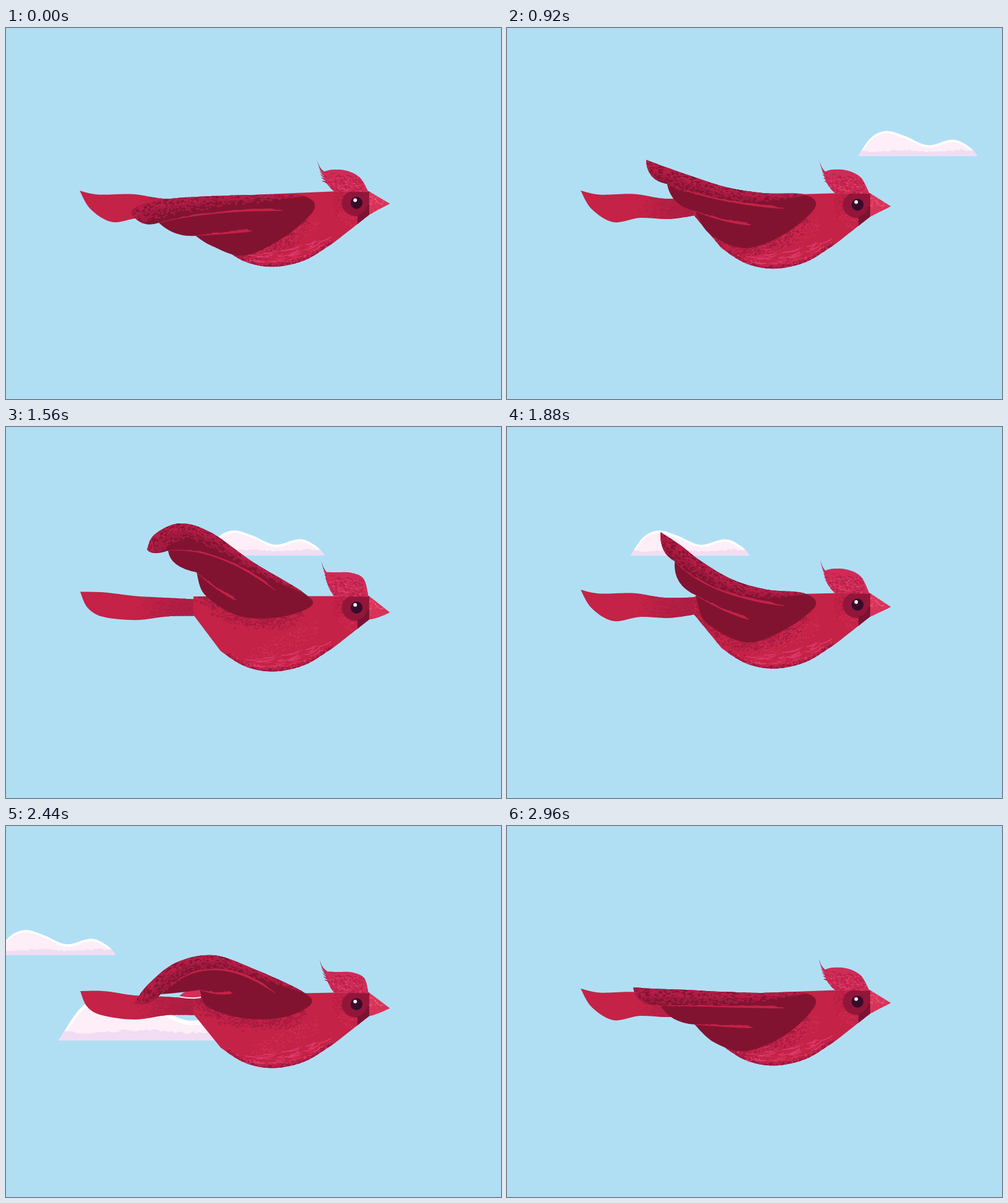
Write an HTML page with a canvas that moves like this. It is 800 px wide and 600 px high and loops after 3 s.

```html
<!DOCTYPE html>
<html lang="en">
<head>
<meta charset="utf-8">
<title>Flying bird</title>
<style>
html, body { margin: 0; width: 100%; height: 100%; overflow: hidden; background: #b0dff4; }
canvas { display: block; width: 800px; height: 600px; }
</style>
</head>
<body>
<canvas id="stage" width="800" height="600"></canvas>
<script>
const ctx = document.getElementById('stage').getContext('2d');
const LOOP = 3000, FLAP = 1000, STEP = 40;
const RED = '#c42246', DARK = '#811331', SHADE = '#a31a41', PINK = '#df3a6d';

// ---- helpers ----
function seeded(seed) {
  return () => {
    seed = (seed + 0x6d2b79f5) | 0;
    let r = Math.imul(seed ^ (seed >>> 15), 1 | seed);
    r ^= r + Math.imul(r ^ (r >>> 7), 61 | r);
    return ((r ^ (r >>> 14)) >>> 0) / 4294967296;
  };
}
function grains(count, seed) {
  const rnd = seeded(seed);
  return Array.from({ length: count }, () => [rnd(), rnd(), rnd(), rnd()]);
}
const swing = (phase, low) => Math.cos(2 * Math.PI * (phase - low) / FLAP);
const lerp = (a, b, k) => a + (b - a) * k;
const shift = (pts, dy) => pts.map(([x, y]) => [x, y + dy]);
const mix = (p, q, k) => p.map((a, i) => [lerp(a[0], q[i][0], k), lerp(a[1], q[i][1], k)]);

// bezier handles of a smooth curve through points
function handles(pts, i) {
  const a = pts[i - 1] || pts[i], b = pts[i], c = pts[i + 1], d = pts[i + 2] || c;
  return [b[0] + (c[0] - a[0]) / 6, b[1] + (c[1] - a[1]) / 6,
          c[0] - (d[0] - b[0]) / 6, c[1] - (d[1] - b[1]) / 6, c[0], c[1]];
}
function curve(path, pts) {
  path.lineTo(...pts[0]);
  for (let i = 0; i < pts.length - 1; i++) path.bezierCurveTo(...handles(pts, i));
}
function through(path, a, m, b) {
  path.quadraticCurveTo(2 * m[0] - (a[0] + b[0]) / 2, 2 * m[1] - (a[1] + b[1]) / 2, ...b);
}
function onCurve(pts, s) {
  const n = pts.length - 1, i = Math.min(n - 1, Math.floor(s * n)), t = s * n - i, u = 1 - t;
  const h = handles(pts, i), p = pts[i];
  const at = k => u * u * u * p[k] + 3 * u * u * t * h[k] + 3 * u * t * t * h[k + 2] + t * t * t * h[k + 4];
  const slope = k => u * u * (h[k] - p[k]) + 2 * u * t * (h[k + 2] - h[k]) + t * t * (h[k + 4] - h[k + 2]);
  return { x: at(0), y: at(1), angle: Math.atan2(slope(1), slope(0)) };
}
function beside(pts, s, d) {
  const p = onCurve(pts, s);
  return { x: p.x - Math.sin(p.angle) * d, y: p.y + Math.cos(p.angle) * d, angle: p.angle };
}
function fleck(p, w, h, color) {
  ctx.fillStyle = color;
  ctx.beginPath();
  ctx.ellipse(p.x, p.y, w, h, p.angle || 0, 0, 7);
  ctx.fill();
}
function fill(path, color) {
  ctx.fillStyle = color;
  ctx.fill(path);
}
function inside(path, draw) {
  ctx.save();
  ctx.clip(path);
  draw();
  ctx.restore();
}

// ---- wing poses: top edge, lower lobes, shoulder, then streak points ----
const poses = [];
const pose = (at, ...n) => poses.push({ at, n });
pose(0, 202, 300, 214, 288, 260, 277, 310, 273, 400, 270, 478, 271,
  222, 316, 247, 315, 274, 332, 306, 336, 334, 353, 385, 368, 450, 338, 498, 293,
  340, 299, 447, 295, 397, 328);
pose(120, 222, 380, 235, 360, 270, 325, 320, 297, 390, 275, 478, 269,
  245, 386, 272, 378, 290, 382, 322, 372, 346, 371, 390, 370, 446, 344, 498, 293,
  345, 312, 447, 296, 396, 338);
pose(240, 212, 345, 232, 328, 270, 304, 320, 283, 400, 268, 478, 270,
  236, 350, 262, 341, 285, 349, 314, 344, 348, 355, 390, 362, 450, 336, 498, 292,
  340, 299, 445, 293, 395, 323);
pose(440, 207, 287, 230, 256, 275, 221, 335, 209, 400, 231, 478, 267,
  230, 286, 250, 272, 283, 269, 313, 265, 327, 293, 385, 311, 450, 309, 493, 288,
  335, 232, 435, 270, 366, 270);
pose(560, 228, 198, 240, 174, 280, 156, 330, 170, 400, 219, 478, 266,
  240, 204, 262, 200, 275, 222, 308, 235, 322, 272, 375, 305, 440, 308, 494, 289,
  345, 212, 435, 264, 372, 280);
pose(680, 303, 112, 322, 138, 350, 170, 385, 207, 425, 242, 478, 269,
  297, 140, 306, 165, 302, 195, 315, 222, 320, 270, 372, 318, 440, 318, 497, 288,
  370, 222, 440, 278, 378, 290);
pose(800, 281, 125, 305, 152, 335, 183, 375, 222, 420, 250, 478, 269,
  278, 152, 292, 180, 290, 210, 310, 242, 320, 290, 380, 336, 445, 326, 498, 288,
  360, 238, 444, 284, 385, 302);
pose(880, 248, 170, 280, 191, 315, 218, 365, 247, 420, 263, 480, 269,
  253, 199, 271, 217, 278, 250, 305, 272, 322, 316, 385, 348, 445, 330, 498, 290,
  340, 262, 447, 289, 391, 311);
pose(960, 204, 261, 235, 263, 290, 265, 345, 268, 410, 270, 480, 270,
  217, 283, 248, 290, 270, 312, 303, 321, 335, 350, 385, 364, 450, 338, 498, 290,
  350, 292, 447, 294, 397, 326);

function wingAt(phase) {
  const count = poses.length;
  const get = i => ({ n: poses[(i + count) % count].n,
    at: poses[(i + count) % count].at + Math.floor(i / count) * FLAP });
  let i = count - 1;
  while (poses[i].at > phase) i--;
  const [a, b, c, d] = [get(i - 1), get(i), get(i + 1), get(i + 2)];
  const span = c.at - b.at, t = (phase - b.at) / span, t2 = t * t, t3 = t2 * t;
  const v = b.n.map((y, k) => {
    const m0 = (c.n[k] - a.n[k]) / (c.at - a.at), m1 = (d.n[k] - y) / (d.at - b.at);
    return (2 * t3 - 3 * t2 + 1) * y + (3 * t2 - 2 * t3) * c.n[k] +
      span * ((t3 - 2 * t2 + t) * m0 + (t3 - t2) * m1);
  });
  const pts = [];
  for (let k = 0; k < v.length; k += 2) pts.push([v[k], v[k + 1]]);
  const [lobe1, notch1, lobe2, notch2, low1, low2, low3, shoulder, mid, end1, end2] = pts.slice(6);
  return { top: pts.slice(0, 6), lobe1, notch1, lobe2, notch2,
    low: [shoulder, low3, low2, low1, notch2], mid, end1, end2 };
}

// ---- clouds ----
const puff = [[0, 0], [20, -29], [45, -40], [75, -32], [112, -17], [152, -26], [178, -15], [192, 0]];
const ragged = grains(65, 5);
const puffPath = new Path2D();
curve(puffPath, puff);
puffPath.closePath();
function cloud(x, y, size) {
  ctx.save();
  ctx.translate(x, y);
  ctx.scale(size, size);
  fill(puffPath, '#fff');
  inside(puffPath, () => {
    ctx.translate(0, 4);
    fill(puffPath, '#fdeef7');
    ragged.forEach(([a, b], i) => fleck({ x: 45 + i * 2.2, y: -37 + a * 3 + puffTop(45 + i * 2.2) }, 2, .4 + b * .6, '#fdeef7'));
    ctx.translate(0, -4);
    ctx.fillStyle = '#f2dcf3';
    ctx.beginPath();
    ctx.moveTo(0, 0);
    ragged.forEach(([a], i) => ctx.lineTo(i * 3, -6.5 - a * 2.5 + Math.sin(i / 5) * 1.2));
    ctx.lineTo(192, 0);
    ctx.fill();
  });
  ctx.restore();
}
function puffTop(x) {
  const i = Math.max(1, puff.findIndex(p => p[0] >= x)), a = puff[i - 1], b = puff[i];
  return 40 + lerp(a[1], b[1], (x - a[0]) / (b[0] - a[0]));
}

// ---- tail ----
const tailTop = [[[119, 263], [150, 269.5], [205, 268.5], [255, 276], [305, 275]],
                 [[120, 267], [158, 267], [208, 274], [255, 276], [305, 279]]];
const tailLow = [[[305, 303], [262, 309], [215, 307], [172, 314], [137, 293], [119, 263]],
                 [[305, 306], [260, 306], [208, 313], [155, 306], [131, 292], [120, 267]]];
const tailGrain = grains(420, 11);
function drawTail(wave) {
  const path = new Path2D();
  path.moveTo(119, lerp(263, 267, wave));
  curve(path, mix(...tailTop, wave));
  curve(path, mix(...tailLow, wave));
  fill(path, RED);
  inside(path, () => {
    const g = ctx.createLinearGradient(215, 0, 290, 0);
    g.addColorStop(0, '#a31a4100');
    g.addColorStop(1, '#a31a4188');
    ctx.fillStyle = g;
    ctx.fillRect(215, 255, 95, 65);
    tailGrain.forEach(([a, b, c, d]) =>
      fleck({ x: 302 - 90 * a * (.4 + .6 * d), y: 270 + b * 42 }, .7 + c * 1.2, .7, '#a81c43'));
  });
}

// ---- body and head ----
const belly = [[588, 301], [550, 331], [522, 352], [480, 376.5], [430, 386], [385, 377], [347, 353]];
const rimGrain = grains(380, 21), pinkGrain = grains(260, 31), shadeGrain = grains(420, 41);
const plumes = grains(44, 51), cheekGrain = grains(130, 61), crestGrain = grains(190, 71), beakGrain = grains(60, 81);

function drawBody(bob, wing) {
  const path = new Path2D(), rim = shift(belly, bob);
  path.moveTo(303, 274);
  path.lineTo(530, 264 + bob);
  path.lineTo(587, 264 + bob);
  curve(path, rim);
  path.lineTo(303, 304);
  path.closePath();
  fill(path, RED);
  inside(path, () => {
    shadeGrain.forEach(([a, b, c, d]) =>
      fleck(beside(wing.low, .1 + a * .85, -22 * b * (.3 + .7 * d)), .8 + c * 1.8, .9, SHADE));
    pinkGrain.forEach(([a, b, c]) =>
      fleck({ x: 395 + a * 110, y: bob + 378 - a * 48 - b * 28, angle: -.4 }, .5 + c, .6, '#d8305f'));
    rimGrain.forEach(([a, b, c, d]) =>
      fleck(beside(rim, .3 + a * .65, 11 * b * d), .6 + c * 1.3, .7, d > .75 ? PINK : '#941540'));
    ctx.strokeStyle = PINK;
    ctx.lineCap = 'round';
    plumes.forEach(([a, b, c, d]) => {
      const x = 385 + a * 122, y = bob + 373 - a * a * 25 + (b - .5) * 16, len = 7 + c * 13;
      ctx.lineWidth = .6 + d * 1.1;
      ctx.beginPath();
      ctx.moveTo(x, y);
      ctx.quadraticCurveTo(x + len / 2, y + 2 - a * 3, x + len, y + 2 - a * 10);
      ctx.stroke();
    });
    drawFace(bob);
  });
}

function drawFace(bob) {
  cheekGrain.forEach(([a, b, c]) => {
    const turn = 1.3 + a * 2.6, r = 22 + b * 16;
    fleck({ x: 566 + Math.cos(turn) * r, y: 283 + bob + Math.sin(turn) * r }, .6 + c * .9, .7, a > .5 ? '#ad1a42' : '#d6315f');
  });
  fleck({ x: 566, y: 283 + bob }, 23.5, 21, '#92163a');
  ctx.fillRect(560, 263 + bob, 29, 38);
  ctx.fillStyle = '#7c1233';
  ctx.fillRect(568, 286 + bob, 21, 40);
  fleck({ x: 566, y: 283 + bob }, 18, 19, '#92163a');
  fleck({ x: 566.5, y: 282.5 + bob }, 9.7, 9.7, '#3a0a2a');
  fleck({ x: 564.3, y: 278.2 + bob }, 2.9, 2.9, '#fff');
}

function drawBeak(bob, tip) {
  const path = new Path2D();
  path.moveTo(587, 264 + bob);
  path.lineTo(620.5, tip);
  path.quadraticCurveTo(600, tip + 10, 587, 302 + bob);
  path.closePath();
  fill(path, '#d93459');
  inside(path, () => beakGrain.forEach(([a, b, c]) =>
    fleck({ x: 588 + a * 28, y: 266 + bob + b * 34 }, .6 + c, .7, b < .6 ? '#ec6a88' : '#cc2a50')));
}

function drawCrest(bob, wave) {
  const tip = [512 + 4 * wave, 233 + 2 * wave], back = [530, 264 + bob];
  const sway = 503 + .7 * bob;
  ctx.fillStyle = '#b31d43';
  for (let i = 0; i < 6; i++) {
    const x = sway + (i ? 1 + i * 1.2 : 0), y = 214 + .3 * bob + (i ? 3 + i * 6.2 : 0);
    const rx = tip[0] + 2 + i * 1.2, ry = tip[1] + i * 3.6;
    ctx.beginPath();
    ctx.moveTo(x, y);
    ctx.quadraticCurveTo(x + 3, ry - 6, rx, ry - 1);
    ctx.lineTo(rx + 1, ry + 2);
    ctx.quadraticCurveTo(x + 2, ry - 4, x, y);
    ctx.fill();
  }
  const path = new Path2D();
  path.moveTo(...tip);
  curve(path, [tip, [526 + 8 * wave, 229 + 7 * wave], [550 + 9 * wave, 230.5 + 6 * wave],
    [572 + 7 * wave, 242 + 4 * wave], [586, 265 + bob]]);
  path.lineTo(...back);
  through(path, back, [517 + 3 * wave, 249 + bob * .6], tip);
  fill(path, '#cf2b57');
  inside(path, () => crestGrain.forEach(([a, b, c, d]) => {
    const x = 511 + a * 70;
    fleck({ x, y: 232 + b * 33 + a * 10 + bob * .6, angle: .35 }, .8 + c * 2, .8, d > .35 ? '#b31c45' : '#e0446f');
  }));
}

// ---- wing ----
const bandGrain = grains(900, 91), streakGrain = grains(24, 101);
const bandWidth = s => 31 * (1 - Math.pow(s, 2.6));

function streak(a, m, b, width) {
  const n = streakGrain.length - 1, upper = [], lower = [];
  const cx = 2 * m[0] - (a[0] + b[0]) / 2, cy = 2 * m[1] - (a[1] + b[1]) / 2;
  streakGrain.forEach(([r], i) => {
    const t = i / n, u = 1 - t;
    const x = u * u * a[0] + 2 * u * t * cx + t * t * b[0];
    const y = u * u * a[1] + 2 * u * t * cy + t * t * b[1];
    const w = width * Math.min(1, .25 + t * 1.4) * Math.min(1, u * 9 + .3);
    upper.push([x, y - w * (.2 + r * .8)]);
    lower.unshift([x, y + w * .35]);
  });
  ctx.fillStyle = RED;
  ctx.beginPath();
  [...upper, ...lower].forEach(p => ctx.lineTo(...p));
  ctx.fill();
}

function drawWing(wing, phase) {
  const { top, lobe1, notch1, lobe2, notch2, low, mid, end1, end2 } = wing;
  const fold = Math.max(0, 1 - Math.abs(phase - 440) / 110);
  if (fold) {
    const [x, y] = notch2, under = new Path2D();
    under.moveTo(x + 2, y - 4);
    under.lineTo(x + 2, y + 13 * fold);
    under.quadraticCurveTo(x - 14, y + 16 * fold, x - 33 * fold, y + 12 * fold);
    under.quadraticCurveTo(x - 20 * fold, y, x + 2, y - 4);
    fill(under, '#fdeef7');
    ctx.save();
    ctx.translate(0, -2 * fold);
    fill(under, '#d32f58');
    ctx.restore();
  }
  const path = new Path2D();
  path.moveTo(...top[0]);
  curve(path, [...top, ...low]);
  through(path, notch2, lobe2, notch1);
  through(path, notch1, lobe1, top[0]);
  path.closePath();
  fill(path, DARK);
  inside(path, () => {
    ctx.fillStyle = '#aa1b42';
    ctx.beginPath();
    for (let i = 0; i <= 40; i++) {
      const p = beside(top, i / 40, -3);
      ctx.lineTo(p.x, p.y);
    }
    for (let i = 40; i >= 0; i--) {
      const p = beside(top, i / 40, bandWidth(i / 40) * .45);
      ctx.lineTo(p.x, p.y);
    }
    ctx.fill();
    bandGrain.forEach(([a, b, c, d]) => {
      const depth = b * (.45 + .55 * d), out = depth > .42;
      fleck(beside(top, a, depth * bandWidth(a)), 1 + c * 2.4, .7 + d * .6,
        out ? '#a81b42' : d > .6 ? DARK : '#b81f49');
    });
    streak(notch1, mid, end1, 3.6);
    streak(notch2, [(notch2[0] + end2[0]) / 2, (notch2[1] + end2[1]) / 2 + (notch2[1] < 300 ? 3 : 0)], end2, 4.2);
  });
}

// ---- scene ----
function draw(time) {
  const phase = time % FLAP;
  const bob = 4 - 6.5 * swing(phase, 150);
  const wave = .5 - .5 * swing(phase, 940);
  const wing = wingAt(phase);
  ctx.fillStyle = '#b0dff4';
  ctx.fillRect(0, 0, 800, 600);
  cloud(920.7 - .3833 * time, 205.7 + time * .001, 1);
  cloud(85 - 1.4 * (time - 2440), 347, 1.9);
  drawTail(wave);
  drawBody(bob, wing);
  drawBeak(bob, 291 - 10 * swing(phase, 130));
  drawCrest(bob, wave);
  drawWing(wing, phase);
}

const start = performance.now();
function tick() {
  const time = (performance.now() - start) % LOOP;
  draw(Math.floor(time / STEP) * STEP);
  requestAnimationFrame(tick);
}
tick();
</script>
</body>
</html>
```
